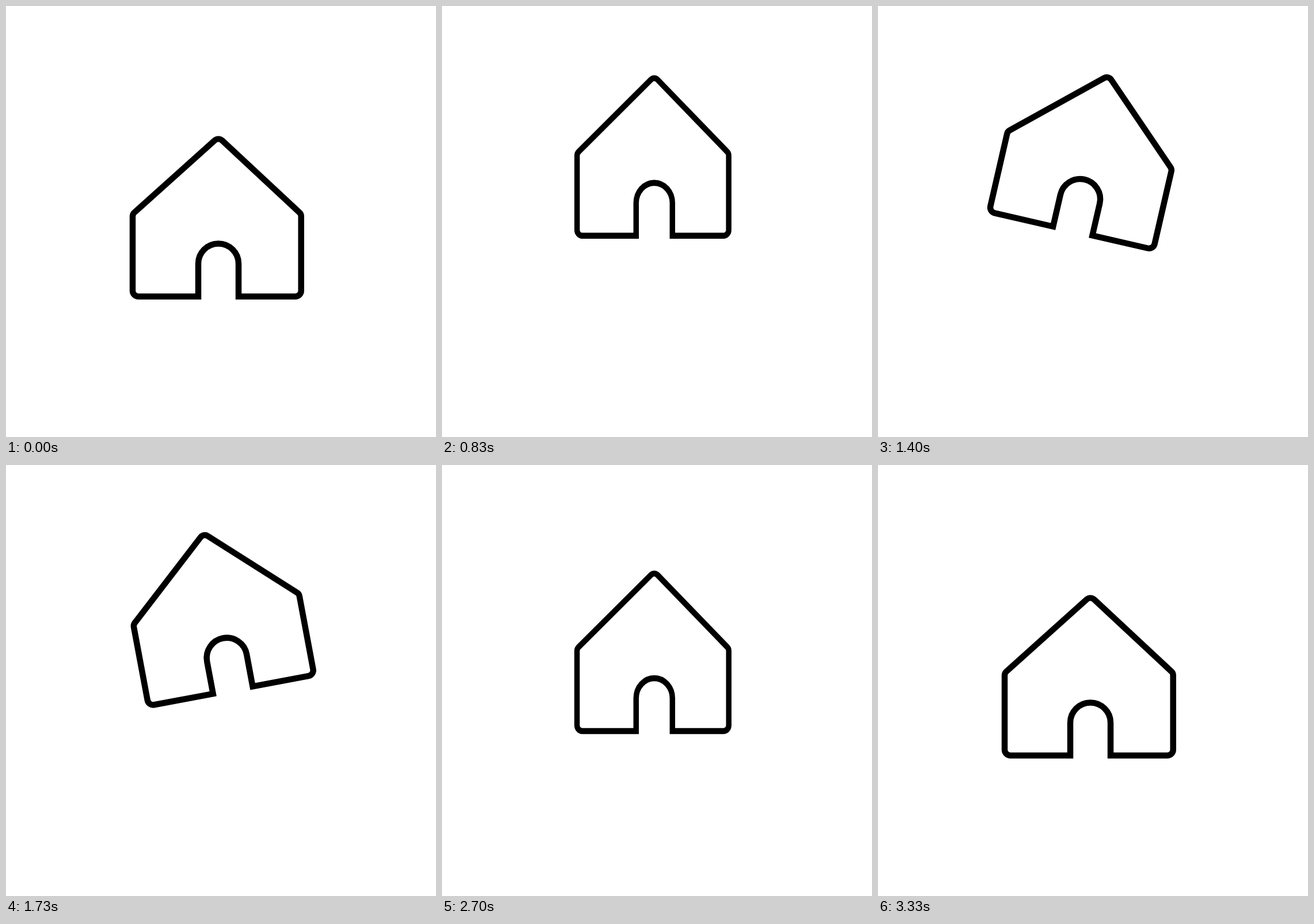
Animation, 747 px wide and 750 px high, one loop 4.06 s. Source, as an HTML page with a canvas:

```html
<!DOCTYPE html>
<html lang="en">
<head>
<meta charset="utf-8">
<title>Hopping house</title>
<style>
  html, body { margin: 0; width: 100%; height: 100%; overflow: hidden; background: #fff; }
  canvas { display: block; }
</style>
</head>
<body>
<canvas id="stage" width="747" height="750"></canvas>
<script>
const ctx = document.getElementById('stage').getContext('2d');
const LOOP = 4060;
const TICK = 100 / 3;
const PIVOT = { x: 366.5, y: 368.5 };

// Symmetric cubic bezier (k, 0, 1 - k, 1), solved for x by bisection
function bezier(k) {
  return u => {
    let lo = 0, hi = 1;
    for (let i = 0; i < 30; i++) {
      const s = (lo + hi) / 2, r = 1 - s;
      const x = 3 * k * s * r * r + 3 * (1 - k) * s * s * r + s * s * s;
      if (x < u) lo = s; else hi = s;
    }
    return lo * lo * (3 - 2 * lo);
  };
}

const sharp = bezier(0.8);
const soft = bezier(0.5);

// Keys are [tick, value]
const lift = [[10, 0], [30, -111], [60, -111], [100, 0]];
const squeeze = [[10, 1], [25, 0.9], [30, 1], [70, 1], [80, 0.9], [90, 1]];
const tilt = [[30, 0], [40, 14.6], [50, -11.3], [60, 0]];

function sample(keys, n, ease) {
  if (n <= keys[0][0]) return keys[0][1];
  for (let i = 1; i < keys.length; i++) {
    const [a, from] = keys[i - 1], [b, to] = keys[i];
    if (n <= b) return from + (to - from) * ease((n - a) / (b - a));
  }
  return keys[keys.length - 1][1];
}

function house() {
  const left = 220, right = 512.7, base = 505.5, eaves = 362;
  const doorL = 334, doorR = 404, mid = 369, r = 35;
  ctx.beginPath();
  ctx.moveTo(doorL, base);
  ctx.arcTo(left, base, left, eaves, 10);
  ctx.arcTo(left, eaves, mid, 228, 9);
  ctx.arcTo(mid, 228, right, eaves, 9.5);
  ctx.arcTo(right, eaves, right, base, 9);
  ctx.arcTo(right, base, doorR, base, 10);
  ctx.lineTo(doorR, base);
  ctx.lineTo(doorR, 448.5);
  ctx.arc(mid, 448.5, r, 0, Math.PI, true);
  ctx.closePath();
  ctx.lineWidth = 10.5;
  ctx.lineJoin = 'miter';
  ctx.strokeStyle = '#000';
  ctx.stroke();
}

function draw(ms) {
  const n = Math.floor((ms % LOOP + 3.4) / TICK);
  ctx.setTransform(1, 0, 0, 1, 0, 0);
  ctx.fillStyle = '#fff';
  ctx.fillRect(0, 0, 747, 750);
  ctx.translate(PIVOT.x, PIVOT.y + sample(lift, n, sharp));
  ctx.rotate(sample(tilt, n, soft) * Math.PI / 180);
  ctx.scale(sample(squeeze, n, sharp), 1);
  ctx.translate(-PIVOT.x, -PIVOT.y);
  house();
}

const start = performance.now();
function loop() {
  draw(performance.now() - start);
  requestAnimationFrame(loop);
}
loop();
</script>
</body>
</html>
```
